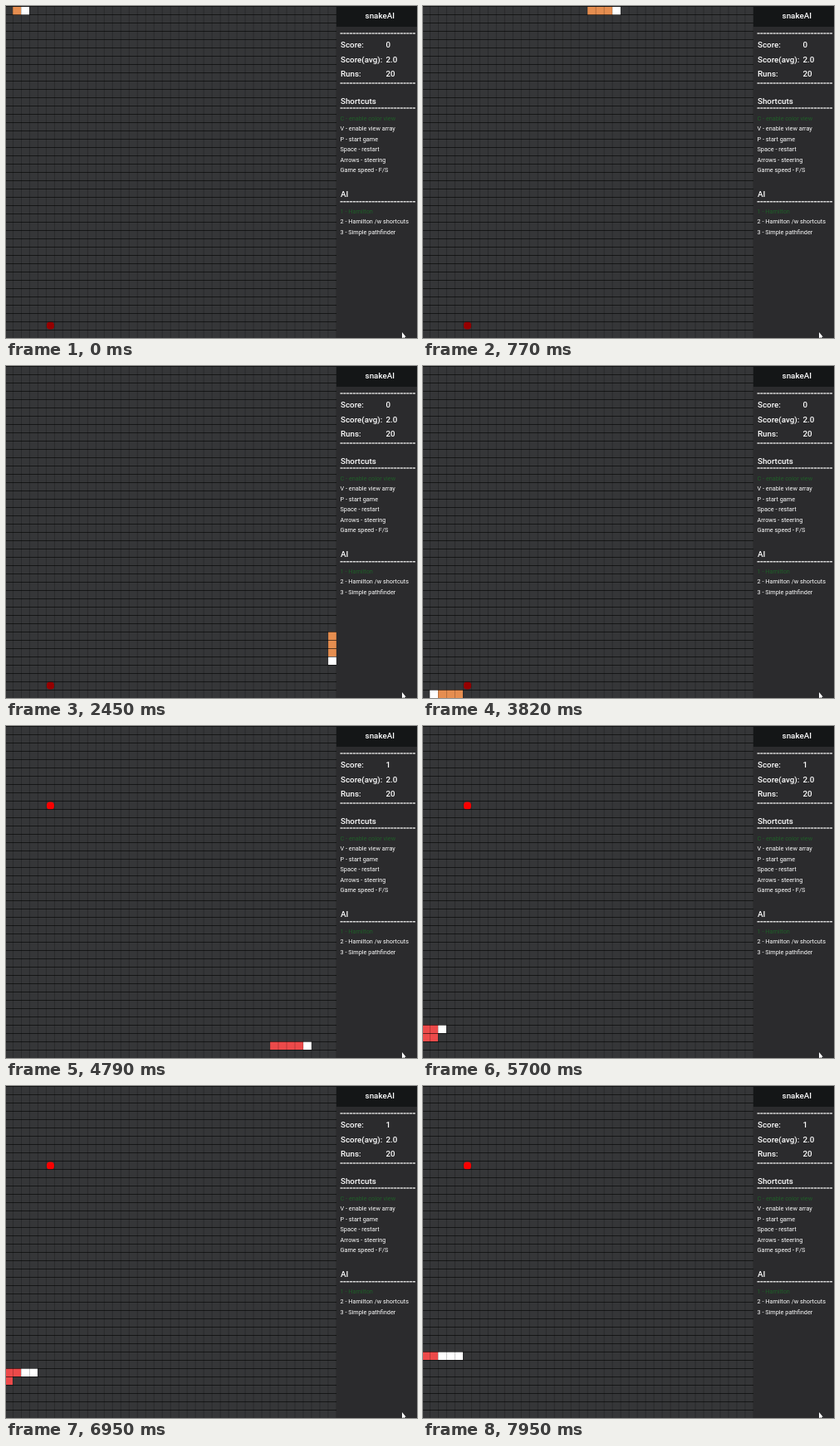
An HTML page that plays this animation: 495 by 400 pixels, repeating every 8000 ms.

```html
<!DOCTYPE html>
<html lang="en">
<head>
<meta charset="utf-8">
<title>snakeAI</title>
<style>
  html, body { margin: 0; width: 100%; height: 100%; overflow: hidden; background: #2b2b2d; }
  svg { display: block; width: 495px; height: 400px; }
  text { font-family: Roboto, Arial, sans-serif; fill: #fff; white-space: pre; }
  .big { font-size: 9.8px; font-weight: 500; }
  .small { font-size: 7.3px; font-weight: 400; }
  .small .active { fill: #1f5f28; }
  .rule { stroke: #d8d8d8; stroke-width: 1.4; stroke-dasharray: 3.2 .6; }
  #snake, #rows { shape-rendering: crispEdges; }
</style>
</head>
<body>
<svg viewBox="0 0 495 400">
  <rect width="398" height="400" fill="#353638"/>
  <rect id="food" x="49" width="9" height="9" rx="3.8"/>
  <g id="snake"></g>
  <g fill="none" stroke="#000">
    <path id="columns" stroke-opacity=".22"/>
    <path id="rows" stroke-opacity=".6"/>
  </g>
  <rect x="398" width="97" height="400" fill="#2b2b2d"/>
  <rect x="398" width="97" height="25" fill="#141617"/>
  <g class="big">
    <text x="450.3" y="15" text-anchor="middle">snakeAI</text>
    <text x="403" y="50">Score:</text><text id="score" x="457.5" y="50">0</text>
    <text x="403" y="67.6">Score(avg):</text><text x="457.5" y="67.6">2.0</text>
    <text x="403" y="85">Runs:</text><text x="457.5" y="85">20</text>
    <text x="403" y="117.5">Shortcuts</text>
    <text x="403" y="229.7">AI</text>
  </g>
  <path class="rule" d="M402.5 33H493M402.5 93H493M402.5 123H493M402.5 235.8H493"/>
  <g class="small">
    <text class="active" x="402.5" y="137.5">C - enable color view</text>
    <text x="402.5" y="150">V - enable view array</text>
    <text x="402.5" y="162.5">P - start game</text>
    <text x="402.5" y="175">Space - restart</text>
    <text x="402.5" y="187.5">Arrows - steering</text>
    <text x="402.5" y="200">Game speed - F/S</text>
    <text class="active" x="402.5" y="249.7">1 - Hamilton</text>
    <text x="402.5" y="262.3">2 - Hamilton /w shortcuts</text>
    <text x="402.5" y="274.8">3 - Simple pathfinder</text>
  </g>
  <path d="M477 393v7.6l1.6-1.5 1 2.4 1.2-.5-1-2.3h2z" fill="#fff"/>
</svg>
<script>
  const LOOP = 8000, LAST = 39, MEAL = 123;
  const $ = id => document.getElementById(id);
  const cellLeft = col => 10 * col - 2;
  const cellTop = row => Math.round(1 + 9.98 * row);

  // Time, distance of the head along its route, evenly spaced redraws since the previous entry
  const pace = [
    [0, 2, 0], [770, 23, 10], [890, 27, 1], [1460, 44, 8], [1690, 51, 3], [2450, 74, 10],
    [2540, 76, 1], [3380, 102, 11], [3820, 116, 5], [3860, 117, 1], [4240, 132, 5],
    [5090, 167, 11], [5700, 198, 8], [5940, 207, 3], [6820, 268, 11], [6870, 272, 1],
    [6950, 277, 1], [7640, 331, 9], [7950, 356, 4]
  ];

  function distance(clock) {
    const next = pace.findIndex(([time]) => time > clock);
    if (next < 0) return pace.at(-1)[1];
    const [t0, d0] = pace[next - 1], [t1, d1, redraws] = pace[next];
    const step = Math.floor((clock - t0) / (t1 - t0) * redraws);
    return Math.round(d0 + (d1 - d0) * step / redraws);
  }

  // Along the top, down the right edge, back along the bottom, then zigzag upwards
  function cellAt(d) {
    if (d <= LAST) return [d, 0];
    if (d <= 2 * LAST) return [LAST, d - LAST];
    if (d <= 3 * LAST) return [3 * LAST - d, LAST];
    const rest = d - 3 * LAST - 1;
    const lane = Math.floor(rest / LAST), step = rest % LAST;
    return [lane % 2 ? LAST - 1 - step : step, LAST - 1 - lane];
  }

  let columns = "", rows = "";
  for (let i = 0; i < 40; i++) {
    columns += `M${8.5 + 9.985 * i} 0V400`;
    rows += `M0 ${10 * i + .5}H398`;
  }
  $("columns").setAttribute("d", columns);
  $("rows").setAttribute("d", rows);

  const segments = Array.from({ length: 5 }, () => {
    const rect = document.createElementNS("http://www.w3.org/2000/svg", "rect");
    rect.setAttribute("width", 10);
    rect.setAttribute("height", 10);
    return $("snake").appendChild(rect);
  });

  function draw(clock) {
    const head = distance(clock);
    const fed = head >= MEAL;
    const size = fed ? 5 : 4;
    const whites = clock < 6020 ? 1 : clock < 7300 ? 2 : 3;

    segments.forEach((rect, i) => {
      const d = head - i;
      const shown = i < size && d >= 1;
      rect.style.display = shown ? "" : "none";
      if (!shown) return;
      const [col, row] = cellAt(d);
      rect.setAttribute("x", cellLeft(col));
      rect.setAttribute("y", cellTop(row));
      rect.setAttribute("fill", i < whites ? "#fff" : fed ? "#ec4a4a" : "#e68e50");
    });

    $("food").setAttribute("y", fed ? 91.5 : 380.5);
    $("food").setAttribute("fill", fed ? "#fa0000" : "#960000");
    $("score").textContent = fed ? 1 : 0;
  }

  const start = performance.now();
  function tick() {
    draw((performance.now() - start) % LOOP);
    requestAnimationFrame(tick);
  }
  tick();
</script>
</body>
</html>
```
